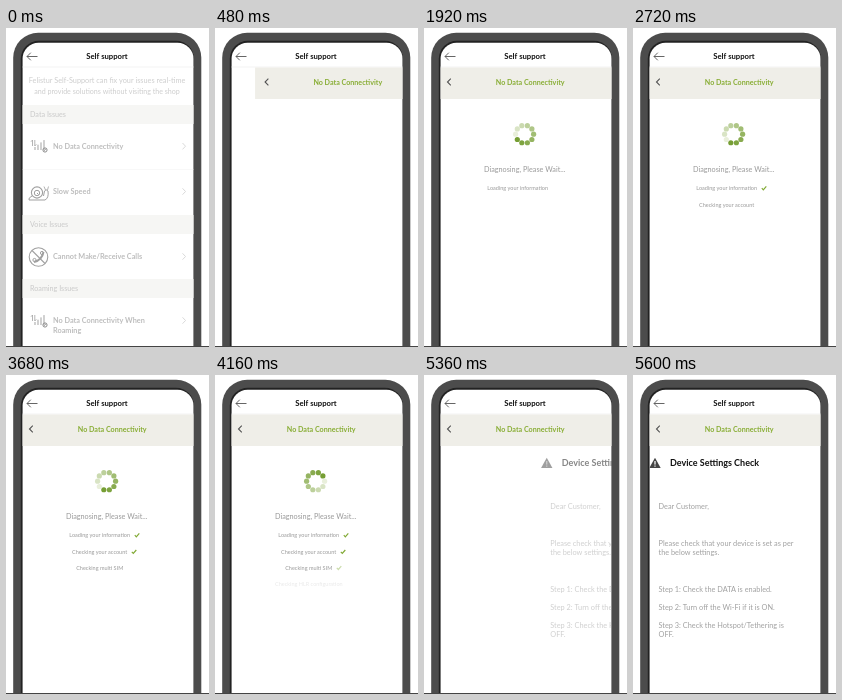
An HTML page with a canvas that plays this animation: 203 px wide and 319 px high, repeating every 5.68 s.

```html
<!DOCTYPE html>
<html lang="en">
<head>
<meta charset="utf-8">
<title>Self support</title>
<style>
  html, body { margin: 0; width: 100%; height: 100%; overflow: hidden; background: #fff; }
  canvas { display: block; width: 203px; height: 319px; }
</style>
</head>
<body>
<canvas id="stage"></canvas>
<script>
const W = 203, H = 319, LOOP = 5680;
const canvas = document.getElementById('stage');
const ctx = canvas.getContext('2d');
const dpr = window.devicePixelRatio || 1;
canvas.width = W * dpr;
canvas.height = H * dpr;

const GREEN = '#88ad34';
const SCREEN = { x: 16.6, y: 14.8, w: 170.9, r: 16 };

const clamp = v => Math.min(1, Math.max(0, v));
const ramp = (t, from, to) => clamp((t - from) / (to - from));
// Remaining distance of a decelerating slide
const slide = (t, from, to) => 173 * Math.pow(1 - ramp(t, from, to), 2.2);

function text(str, x, y, size, color, weight = 400, align = 'left') {
  ctx.font = `${weight} ${size}px Lato, "Open Sans", sans-serif`;
  ctx.fillStyle = color;
  ctx.textAlign = align;
  ctx.fillText(str, x, y);
}

function line(points, color, width = 1) {
  ctx.beginPath();
  points.forEach(([x, y], i) => i ? ctx.lineTo(x, y) : ctx.moveTo(x, y));
  ctx.strokeStyle = color;
  ctx.lineWidth = width;
  ctx.stroke();
}

function ring(x, y, r, color, width) {
  ctx.beginPath();
  ctx.arc(x, y, r, 0, Math.PI * 2);
  ctx.strokeStyle = color;
  ctx.lineWidth = width;
  ctx.stroke();
}

function box(x, y, w, h, color) {
  ctx.fillStyle = color;
  ctx.fillRect(x, y, w, h);
}

function rounded(x, y, w, r, color) {
  ctx.beginPath();
  ctx.roundRect(x, y, w, 360, r);
  ctx.fillStyle = color;
  ctx.fill();
}

function layer(alpha, dx, draw) {
  if (alpha <= 0) return;
  ctx.save();
  ctx.globalAlpha = alpha;
  ctx.translate(dx, 0);
  draw();
  ctx.restore();
}

function signalIcon(x, y) {
  const c = '#a2a2a2';
  line([[x + 1.5, y + 6], [x + 1.5, y], [x, y + 1.7]], c, 0.8);
  line([[x + 3.8, y], [x + 3.8, y + 6], [x + 5.3, y + 4.3]], c, 0.8);
  for (let i = 0; i < 4; i++) {
    const h = 3 + i * 2.3;
    line([[x + 4 + i * 3, y + 10], [x + 4 + i * 3, y + 10 - h]], c, 1);
  }
  ring(x + 14, y + 10, 2.1, '#8c8c8c', 1);
  line([[x + 12.6, y + 11.4], [x + 15.4, y + 8.6]], '#8c8c8c', 0.7);
}

function snailIcon() {
  const c = '#a0a0a0';
  ring(31, 164.5, 5.6, c, 1.1);
  ring(31, 165, 2.7, c, 1);
  line([[31, 165], [32.5, 166.5]], c, 1);
  ctx.beginPath();
  ctx.moveTo(26, 168);
  ctx.quadraticCurveTo(22, 170, 23, 172);
  ctx.lineTo(39, 172);
  ctx.quadraticCurveTo(43, 170, 42, 163);
  ctx.quadraticCurveTo(40, 160.5, 38.5, 163);
  ctx.lineTo(37.5, 168);
  ctx.stroke();
  line([[39.5, 162], [38, 158.5]], c, 0.8);
  line([[41.5, 162], [42.5, 158.5]], c, 0.8);
}

function callIcon() {
  const c = '#a0a0a0';
  ring(32.5, 229, 9.3, c, 1.1);
  line([[26, 222.5], [39, 235.5]], c, 1.1);
  ctx.beginPath();
  ctx.moveTo(28, 234);
  ctx.quadraticCurveTo(36, 232, 37.5, 224);
  ctx.lineWidth = 2;
  ctx.stroke();
  ring(28.5, 232, 1.6, c, 1);
  ring(36, 225, 1.6, c, 1);
}

function issueList() {
  text('Felistur Self-Support can fix your issues real-time', 101, 55, 7.3, '#cdcdcd', 400, 'center');
  text('and provide solutions without visiting the shop', 101, 66.3, 7.1, '#cdcdcd', 400, 'center');
  [['Data Issues', 89], ['Voice Issues', 199], ['Roaming Issues', 263]].forEach(([label, y]) => {
    box(15, y - 12, 174, 19, '#f6f6f4');
    text(label, 24, y, 7.2, '#c9c9c9');
  });
  [['No Data Connectivity', 120.7], ['Slow Speed', 166], ['Cannot Make/Receive Calls', 231],
   ['No Data Connectivity When', 295], ['Roaming', 304.5]].forEach(([label, y], i) => {
    text(label, 47, y, 7.3, '#bdbdbd', 700);
    if (i < 4) line([[176.5, y - 5.7], [179.5, y - 2.5], [176.5, y + 0.7]], '#d6d6d6', 0.9);
  });
  box(15, 141, 174, 0.5, '#f1f1f1');
  signalIcon(25, 112);
  snailIcon();
  callIcon();
  signalIcon(25, 287);
}

function issueHeader() {
  box(13.5, 39.5, 180, 31.5, '#efeee8');
  line([[26.8, 50.7], [23.5, 54], [26.8, 57.3]], '#555', 1.1);
  text('No Data Connectivity', 71.8, 56.6, 7.15, GREEN, 700);
}

function spinner(t) {
  const n = 10, step = 360 / n;
  const head = 270 + step * Math.round((t - 1120) / 90);
  for (let i = 0; i < n; i++) {
    const deg = (i + 0.5) * step;
    const lag = (((head - deg) % 360) + 360) % 360 / 360;
    const k = Math.pow(lag, 1.2);
    const a = (deg - 90) * Math.PI / 180;
    ctx.beginPath();
    ctx.arc(100.6 + 9 * Math.cos(a), 106.2 + 9 * Math.sin(a), 2.6, 0, Math.PI * 2);
    ctx.fillStyle = `rgb(${118 + 130 * k}, ${158 + 92 * k}, ${52 + 190 * k})`;
    ctx.fill();
  }
}

function check(x, y) {
  line([[x - 2.2, y], [x - 0.7, y + 1.6], [x + 2.3, y - 1.8]], '#82aa36', 1.2);
}

const TASKS = [
  ['Loading your information', 63.3, 162, 560, 131, 2020],
  ['Checking your account', 66, 178.6, 2040, 128, 3080],
  ['Checking multi SIM', 70.2, 194.7, 3100, 124, 4120],
  ['Checking HLR configuration', 60, 211, 4140, 0, LOOP]
];

function diagnosis(t) {
  spinner(t);
  text('Diagnosing, Please Wait...', 100.7, 144, 7.25, '#999', 400, 'center');
  const base = ctx.globalAlpha;
  for (const [label, x, y, start, checkX, done] of TASKS) {
    ctx.globalAlpha = base * ramp(t, start, start + 100);
    text(label, x, y, 5.5, '#999');
    ctx.globalAlpha = base * ramp(t, done, done + 100);
    if (checkX) check(checkX, y - 1.8);
  }
}

function settings() {
  ctx.beginPath();
  ctx.moveTo(22, 82.8);
  ctx.lineTo(27.7, 93);
  ctx.lineTo(16.3, 93);
  ctx.closePath();
  ctx.fillStyle = '#444';
  ctx.fill();
  box(21.4, 86, 1.2, 3.6, '#fff');
  box(21.4, 90.5, 1.2, 1.2, '#fff');
  text('Device Settings Check', 37, 91.3, 9, '#111', 700);
  [['Dear Customer,', 134], ['Please check that your device is set as per', 171],
   ['the below settings.', 180], ['Step 1: Check the DATA is enabled.', 216.5],
   ['Step 2: Turn off the Wi-Fi if it is ON.', 235],
   ['Step 3: Check the Hotspot/Tethering is', 253], ['OFF.', 262]]
    .forEach(([label, y]) => text(label, 25.5, y, 7.35, '#a0a0a0'));
}

function phone() {
  rounded(7.2, 4.8, 188.1, 25, '#4c4c4c');
  rounded(14.8, 12.8, 173.2, 18, '#222');
}

function draw(t) {
  ctx.setTransform(dpr, 0, 0, dpr, 0, 0);
  box(0, 0, W, H, '#fff');
  phone();

  ctx.save();
  rounded(SCREEN.x, SCREEN.y, SCREEN.w, SCREEN.r, '#fff');
  ctx.clip();

  layer(1 - ramp(t, 0, 260), 0, issueList);
  box(15, 38.6, 174, 0.8, '#f0f0f0');
  if (t > 160) layer(1, slide(t, 160, 720), issueHeader);
  layer(ramp(t, 520, 680) * (1 - ramp(t, 5100, 5240)), 0, () => diagnosis(t));
  layer(ramp(t, 5300, 5420), slide(t, 5300, 5580), settings);

  line([[31.5, 28.5], [21, 28.5]], '#555', 0.9);
  line([[24.8, 24.7], [21, 28.5], [24.8, 32.3]], '#555', 0.9);
  text('Self support', 101, 30.7, 7.7, '#111', 700, 'center');
  ctx.restore();

  box(0, 318, W, 1, '#444');
}

function tick() {
  draw(performance.now() % LOOP);
  requestAnimationFrame(tick);
}
tick();
</script>
</body>
</html>
```
